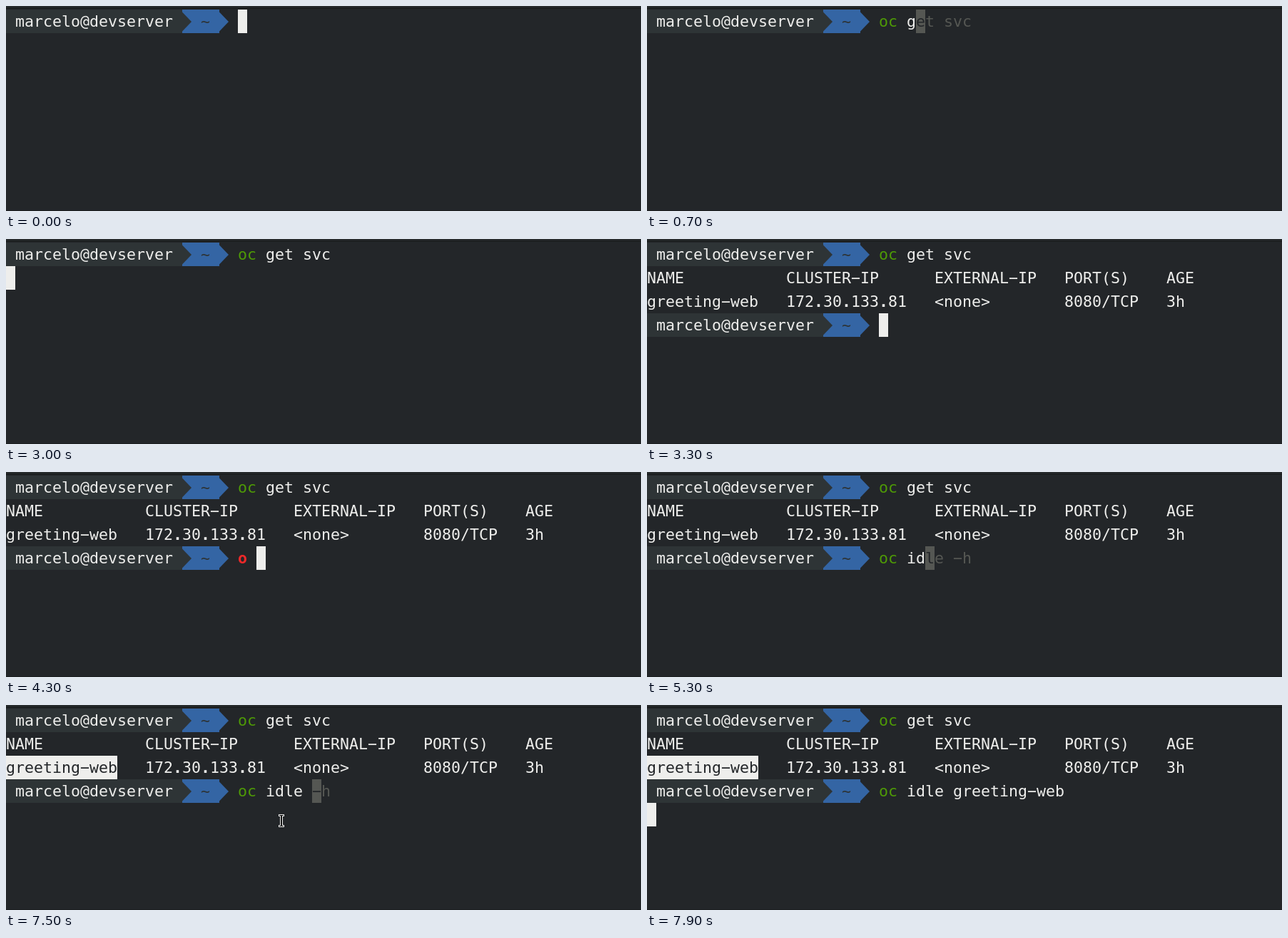
These frames come from a looping animation (890 px wide and 287 px high, 8000 ms). An HTML page with a canvas:

```html
<!DOCTYPE html>
<html lang="en">
<head>
<meta charset="utf-8">
<title>Terminal</title>
<style>
html, body { margin: 0; width: 100%; height: 100%; overflow: hidden; background: #232629; }
canvas { display: block; }
</style>
</head>
<body>
<canvas id="stage" width="890" height="287"></canvas>
<script>
const ctx = document.getElementById('stage').getContext('2d');
const LOOP = 8000, CELL = 13, ROW = 33, TOP = 5;
const BG = '#232629', FG = '#eeeeec', DARK = '#2e3436', BLUE = '#3465a4';
const GREEN = '#4e9a06', RED = '#ef2929', DIM = '#555753';
const FONT = '21.6px "DejaVu Sans Mono", monospace';
const INPUT = 25; // first column after the prompt

const user = 'marcelo@devserver';
const service = 'greeting-web';
const first = 'oc get svc', second = 'oc idle -h', pasted = 'oc idle ' + service;

// [time, typed text, suggested line]
const firstKeys = [[0, '', ''],
  ...[300, 400, 600, 700, 900, 1000, 1100, 1200, 1400, 1600]
    .map((t, i) => [t, first.slice(0, i + 1), first])];
const secondKeys = [
  [3300, '', ''], [3800, 'o c', ''], [4300, 'o ', ''], [4400, 'o', first],
  [4500, 'oc', first], [4700, 'oc ', first],
  ...[4900, 5300, 5500, 5600, 5900].map((t, i) => [t, second.slice(0, i + 4), second]),
  [7700, pasted, '']
];
// [time, x, y]
const pointer = [
  [6400, 200, 199], [6500, 152, 160], [6600, 114, 122], [6700, 93, 99],
  [6800, 85, 91], [6900, 83, 88], [7400, 236, 128], [7500, 386, 162]
];

const rowY = row => TOP + row * ROW;
const at = (steps, t) => steps.filter(s => s[0] <= t).pop();

function box(x, y, w, h, color) {
  ctx.fillStyle = color;
  ctx.fillRect(x, y, w, h);
}

function print(row, col, text, color, bold) {
  ctx.fillStyle = color;
  [...text].forEach((ch, i) => {
    ctx.font = (bold || ch === '.' ? 'bold ' : '') + FONT;
    ctx.fillText(ch === '-' ? '\u2212' : ch, (col + i) * CELL, rowY(row) + 24);
  });
}

function cursor(row, col, color = FG) {
  box(col * CELL, rowY(row), CELL, ROW, color);
}

function arrow(x, row, color) {
  const y = rowY(row) + 17;
  ctx.fillStyle = color;
  ctx.beginPath();
  ctx.moveTo(x, y - 13.5);
  ctx.lineTo(x + CELL, y);
  ctx.lineTo(x, y + 13.5);
  ctx.fill();
}

function prompt(row) {
  box(0, rowY(row), 247, ROW, DARK);
  box(247, rowY(row), 52, ROW, BLUE);
  arrow(247, row, DARK);
  arrow(299, row, BLUE);
  print(row, 1, user, FG);
  print(row, 21, '~', DARK);
}

function command(row, typed, hint, active) {
  const end = INPUT + typed.length;
  const word = typed.split(' ')[0];
  const known = word === 'oc';
  const rest = hint.slice(typed.length);
  print(row, INPUT, word, known ? GREEN : RED, !known);
  print(row, INPUT + word.length, typed.slice(word.length), FG);
  print(row, end, rest, DIM);
  if (active) {
    cursor(row, end, rest ? DIM : FG);
    print(row, end, rest.slice(0, 1), BG);
  }
}

function table(selected) {
  const cols = [0, 15, 31, 45, 56];
  const head = ['NAME', 'CLUSTER-IP', 'EXTERNAL-IP', 'PORT(S)', 'AGE'];
  const data = [service, '172.30.133.81', '<none>', '8080/TCP', '3h'];
  if (selected) box(0, rowY(2), service.length * CELL, ROW, FG);
  cols.forEach((c, i) => {
    print(1, c, head[i], FG);
    print(2, c, data[i], selected && i === 0 ? BG : FG);
  });
}

function ibeam(x, y) {
  box(x - 4, y - 9, 8, 3, FG);
  box(x - 4, y + 6, 8, 3, FG);
  box(x - 2, y - 8, 4, 16, FG);
  box(x - 3, y - 8, 6, 1, '#111');
  box(x - 3, y + 7, 6, 1, '#111');
  box(x - 1, y - 8, 2, 16, '#111');
}

function draw(t) {
  box(0, 0, 890, 287, BG);
  box(0, 0, 890, 2, '#282c2e');
  box(0, 2, 890, 2, '#1c1f20');
  box(0, 286, 890, 1, '#1c1f20');

  prompt(0);
  const [, typed, hint] = at(firstKeys, t);
  command(0, typed, hint, t < 1800);

  if (t >= 1800 && t < 3100 && !(t >= 2400 && t < 3000)) cursor(1, 0);
  if (t >= 3100) table(t >= 7300);
  if (t >= 3100 && t < 3300) cursor(3, 0);
  if (t >= 3300) {
    const [, text, line] = at(secondKeys, t);
    prompt(3);
    command(3, text, line, t < 7900);
  }
  if (t >= 7900) cursor(4, 0);

  if (t >= 6400 && t < 7700) {
    const [, x, y] = at(pointer, t);
    ibeam(x, y);
  }
}

const start = performance.now();
function tick() {
  draw((performance.now() - start) % LOOP);
  requestAnimationFrame(tick);
}
tick();
</script>
</body>
</html>
```
